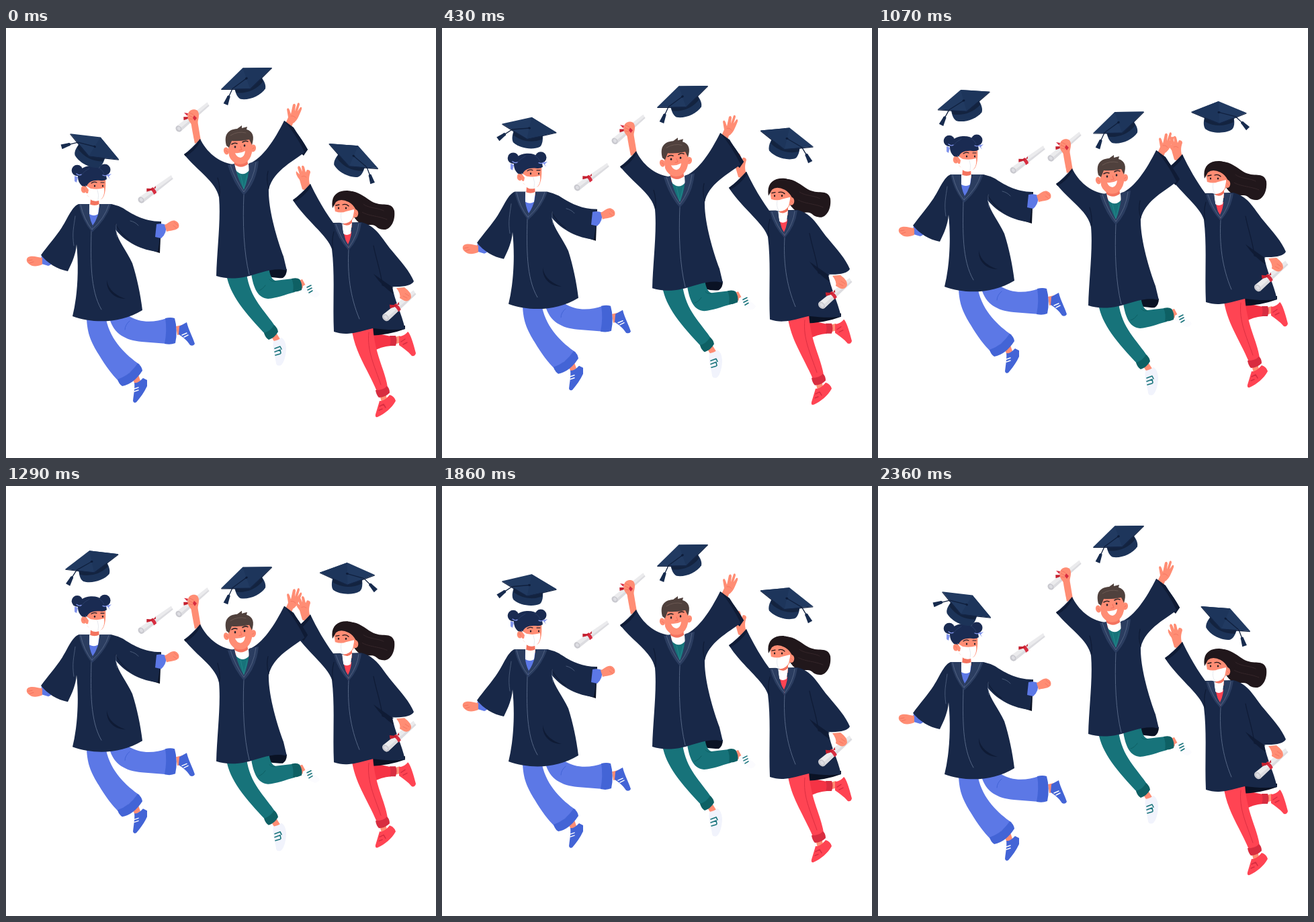
These frames come from a looping animation (640x640 px, 2.43 s). An HTML page:

```html
<!DOCTYPE html>
<html lang="en">
<head>
<meta charset="utf-8">
<title>Graduates</title>
<style>
  html, body { margin: 0; width: 100%; height: 100%; overflow: hidden; background: #fff; }
  svg { display: block; width: 100%; height: 100%; }
</style>
</head>
<body>
<svg id="stage" viewBox="0 0 640 640"></svg>
<script>
const NAVY = '#182848', DEEP = '#0f1b35', LAPEL = '#2b3d60', SEAM = '#556685',
      SKIN = '#ff8d74', FLUSH = '#f4735f', BLUE = '#5c78e6', BLUE2 = '#4364d6',
      TEAL = '#17737a', TEAL2 = '#0e6064', RED = '#ff4453', RED2 = '#d82d40';

const fill = (d, c) => `<path d="${d}" fill="${c}"/>`;
const line = (d, c, w = 1) =>
  `<path d="${d}" fill="none" stroke="${c}" stroke-width="${w}" stroke-linecap="round" stroke-linejoin="round"/>`;
const dot = (x, y, rx, c, ry = rx, a = 0) =>
  `<ellipse cx="${x}" cy="${y}" rx="${rx}" ry="${ry}" fill="${c}" transform="rotate(${a} ${x} ${y})"/>`;
const group = (id, ...parts) => `<g id="${id}">${parts.join('')}</g>`;

const scroll = (x, y, a, w = 1) => `<g transform="translate(${x} ${y}) rotate(${a}) scale(1 ${w})">` +
  fill('M0-5 L58-3 L57 3 L0 5Z', '#ebebed') + fill('M0 1 L57 1 L57 3 L0 5Z', '#dcdce0') +
  dot(0, 0, 4.2, '#c9c9cf', 5) + dot(0.5, 0, 2.2, '#dedee3', 2.8) +
  fill('M20-5 L25-5 Q27 0 25 5 L20 5 Q22 0 20-5Z', RED2) +
  fill('M23-4 L17-9 L14-5 L19-3 L23-2 L30-4 L28-1Z', '#c4202f') + '</g>';

const cap = (id, flip = 1) => `<g id="${id}"><g transform="scale(${flip} 1)">` +
  fill('M-22 6 C-24 16-23 22-20 25 C-10 32 10 32 20 25 C23 21 23 14 21 6Z', '#1c3358') +
  fill('M-22 6 L21 6 L21 14 Q0 25-22 14Z', '#13233f') +
  fill('M-41 0 L1-16.5 L41 0 L-1 16.5Z', '#213a61') +
  fill('M-41 0 L-1 16 L41 0 L41 1.2 L-1 18 L-41 1.2Z', '#142545') +
  fill('M1-16.5 L41 0 L-1 16 L0 0Z', '#1d355b') +
  dot(0, 0, 2, '#0e1c38', 1.5) +
  line('M0 0 L-25 6 L-35 15', '#10203e', 1.3) +
  fill('M-36 13 L-46 21 L-41 26 L-34 17Z', '#172b4e') + dot(-35, 15, 2.2, '#172b4e') +
  '</g></g>';

const girlLeft = group('girlLeft',
  scroll(201, 256, -36.5),
  // legs
  fill('M253 444 L262 442 L264 455 L255 457Z', SKIN),
  fill('M258 444 L269 438 C272 450 278 460 281 470 Q279 474 274 472 C269 464 262 459 257 456Z', BLUE2),
  line('M262 457 L269 454 M265 460 L271 457', '#fff', 1.5),
  fill('M154 432 C160 455 178 465 202 467 L240 470 L239 432 C222 438 200 440 182 428Z', BLUE),
  fill('M237 432 Q245 430 251 432 Q256 450 252 469 Q245 472 236 470 Q240 450 237 432Z', BLUE2),
  line('M184 436 Q177 442 177 449', BLUE2),
  fill('M188 522 L197 516 L200 525 L192 530Z', SKIN),
  fill('M191 528 C196 529 201 524 204 521 L210 524 L210 533 C206 542 200 550 194 557 Q190 559 189 555 C190 545 192 536 191 528Z', BLUE2),
  line('M191 537 L197 535 M191 541 L197 539', '#fff', 1.5),
  fill('M120 432 C121 456 127 468 138 486 C148 503 158 516 168 526 L199 501 C179 487 156 466 149 434Z', BLUE),
  fill('M166 523 Q184 517 196 499 Q202 503 203 510 Q190 530 173 533 Q168 530 166 523Z', BLUE2),
  // left hand
  fill('M54 336 L71 346 Q69 352 63 354 L53 351 Q51 344 54 336Z', BLUE),
  fill('M54 342 C47 341 39 338 33 341 C29 344 31 349 34 351 C39 356 47 355 54 352Z', SKIN),
  line('M33 346 L39 345 M35 350 L41 348', FLUSH),
  // gown
  fill('M163 290 L231 288 L229 335 L210 329Z', '#0a1122'),
  fill('M108 262 C98 266 92 283 83 297 C74 311 62 324 52 338 C62 350 76 359 92 362 C99 348 104 336 105 322 C108 350 107 380 104 402 Q102 417 99 429 C130 440 170 440 203 420 C200 396 195 372 188 350 C180 332 167 318 163 300 C178 319 203 331 226 333 Q230 310 230 288 C205 288 186 276 174 268 Q166 264 157 262Z', NAVY),
  line('M103 280 C101 296 98 305 101 324', SEAM, 0.8),
  line('M163 292 Q171 307 184 316', DEEP, 1.2),
  line('M164 292 Q163 302 165 311', SEAM, 0.7),
  line('M185 287 Q193 289 197 294', SEAM, 0.8),
  fill('M150 375 C152 390 165 399 178 403 C163 403 149 393 150 375Z', DEEP),
  line('M127 302 C126 345 125 390 142 419', SEAM),
  fill('M124 263 L139 263 L138 279 L129 303 L123 279Z', BLUE),
  fill('M126 254 L138 254 L139 267 L125 267Z', FLUSH),
  fill('M124 262 Q132 266 139 262 L137 277 Q131 281 124 277Z', '#fff'),
  fill('M108 262 L124 262 Q122 280 129 294 L128 304 Q113 286 108 262Z', LAPEL),
  fill('M157 262 L140 262 Q138 282 129 294 L128 304 Q148 287 157 262Z', LAPEL),
  line('M111 263 Q116 285 128 300 Q147 283 153 263', SEAM, 0.9),
  // right hand
  fill('M224 292 Q232 290 238 293 Q240 305 231 313 L222 311Z', BLUE),
  fill('M236 293 C242 291 246 285 252 287 Q259 290 257 297 C252 302 245 301 239 303Z', SKIN),
  line('M250 289 L256 294 M249 294 L254 298', FLUSH, 0.8),
  // head
  dot(106, 212, 8.3, '#1a2b52'), dot(147, 211, 8.5, '#1a2b52'),
  fill('M118 226 L148 222 C149 236 148 249 143 254 C134 259 122 254 119 245Z', SKIN),
  dot(116, 240, 4.3, SKIN, 5.5), line('M114 239 Q117 238 117 242', FLUSH, 0.8),
  fill('M107 222 C107 210 117 205 128 205 C141 205 149 212 150 225 Q146 228 140 227 C130 226 122 229 120 236 L113 235 C109 231 107 227 107 222Z', '#1a2b52'),
  line('M111 220 Q117 212 124 209 M136 207 Q144 211 146 217', '#30446f', 0.7),
  dot(132, 235, 1.2, '#25202d', 1.6), dot(144, 235, 1.1, '#25202d', 1.5),
  line('M127 231 Q131 228 135 230 M141 230 L146 230', '#25202d', 1.2),
  fill('M118 234 L126 239 Q137 241 146 238 C147 247 145 254 138 257 C130 259 125 256 123 251 L118 246 L122 246 L123 241Z', '#fff'),
  line('M136 241 Q139 249 137 256', '#e2e4ea', 0.8),
  fill('M102 220 L107 222 L105 230 L102 228Z M150 219 L157 217 L153 221 L155 225Z', '#8295ed'),
  line('M105 217 Q109 220 112 218 M144 219 Q149 221 152 218', '#8295ed', 1.3));

const boy = group('boy',
  // legs
  fill('M435 376 L441 374 L447 385 L440 388Z', SKIN),
  fill('M442 384 L451 379 C454 388 464 390 467 396 Q465 401 459 401 C451 398 447 393 441 390Z', '#fbfbfe'),
  line('M448 386 L454 383 M449 390 L455 387 M451 394 L456 391', TEAL, 1.6),
  fill('M390 356 L418 359 Q418 368 412 372 Q400 373 388 369Z', '#0a1224'),
  fill('M364 359 C367 383 373 402 390 403 C403 402 415 397 430 393 L427 373 L401 376 Q393 374 391 355Z', TEAL),
  fill('M425 373 Q433 371 437 374 Q442 382 440 390 Q434 393 427 393 Q429 382 425 373Z', TEAL2),
  line('M392 374 Q395 378 401 377 M376 391 Q382 389 386 383', TEAL2),
  fill('M394 458 L403 455 L408 463 L400 468Z', SKIN),
  fill('M398 466 Q405 465 410 461 Q416 464 417 476 C417 486 414 499 409 502 Q403 504 402 499 C401 489 396 478 398 466Z', '#f1f3fc'),
  line('M400 477 L408 474 L410 478 M400 482 L408 479 L409 484 M401 487 L408 485', TEAL, 1.6),
  fill('M328 367 C333 397 355 423 388 458 L402 446 C385 420 363 403 358 365Z', TEAL),
  fill('M384 454 Q394 451 399 442 Q404 446 405 452 Q400 461 391 464 Q386 461 384 454Z', TEAL2),
  // arms
  fill('M275 139 C277 152 279 162 281 172 L290 168 L285 138Z', SKIN),
  scroll(257, 150, -40),
  fill('M271 128 C272 122 280 119 285 123 C289 128 286 136 285 142 L276 143 C272 138 269 134 271 128Z', SKIN),
  line('M273 126 L279 129 M272 130 L278 133 M273 135 L278 136', FLUSH, 0.9),
  fill('M265 126 L271 127 L270 131Z M280 130 L284 134 L281 138 L278 134Z', RED2),
  fill('M412 151 L420 133 L418 121 Q420 117 422 122 L424 128 L427 114 Q430 111 431 115 L430 124 L434 112 Q437 110 437 114 L434 124 L438 118 Q441 117 440 121 C436 131 433 139 427 142 L422 156Z', SKIN),
  line('M424 131 Q429 130 431 134', FLUSH, 0.8),
  // gown
  fill('M414 138 L428 148 L449 181 L443 190 L420 170Z', DEEP),
  fill('M289 165 C298 184 316 200 338 203 L362 202 C382 194 400 166 414 138 Q432 150 449 181 C430 198 399 210 391 240 C390 270 404 316 413 340 L418 361 C400 355 375 366 358 370 C340 374 325 373 313 369 C314 330 320 285 317 252 C312 228 286 214 265 188 Q276 180 289 165Z', NAVY),
  fill('M414 138 Q433 152 449 181 L445 186 Q431 157 414 138Z', DEEP),
  fill('M289 165 Q278 182 265 188 L267 191 Q281 184 289 169Z', DEEP),
  line('M390 213 Q387 226 391 239 M315 223 Q319 236 318 250', DEEP, 1.2),
  line('M354 248 C352 290 354 335 362 367', SEAM),
  fill('M342 211 L363 209 L362 228 L354 246 L345 226Z', TEAL),
  line('M349 218 L354 240 L359 219', '#278c8f', 0.8),
  fill('M339 196 L359 194 L361 211 Q350 217 341 210Z', FLUSH),
  fill('M340 203 Q350 211 361 202 L362 212 Q353 222 343 213Z', '#fff'),
  fill('M330 204 L340 202 Q343 221 354 241 L354 249 Q338 231 330 204Z', LAPEL),
  fill('M376 198 L362 201 Q362 223 354 241 L354 249 Q373 230 376 198Z', LAPEL),
  line('M334 204 Q342 228 354 244 Q369 225 372 200', SEAM, 0.9),
  // head
  dot(328, 183, 4, SKIN, 5.5, -15), dot(368, 179, 4, SKIN, 5.5, 10),
  line('M327 182 L330 185 M369 178 L366 181', FLUSH),
  fill('M330 167 L365 164 C369 180 366 195 356 201 C345 206 335 199 332 190Z', SKIN),
  fill('M328 175 C324 159 330 151 344 150 L351 145 L351 149 L359 147 L358 151 C368 154 370 162 366 174 L362 166 Q348 169 336 168 L332 178Z', '#50413d'),
  line('M334 160 Q345 153 357 156', '#6a5852'),
  line('M336 173 Q340 170 344 172 M352 170 Q356 167 360 169', '#33282a', 1.6),
  dot(341, 177, 1.3, '#24202a', 1.8), dot(355, 175, 1.3, '#24202a', 1.8),
  line('M349 176 L351 181 L347 182', FLUSH, 1.2),
  fill('M341 186 Q349 187 356 183 Q355 192 349 193 Q343 192 341 186Z', '#fff'));

const girlRight = group('girlRight',
  // legs
  fill('M579 460 L586 458 L589 468 L581 470Z', SKIN),
  fill('M585 459 C590 459 595 456 598 452 C601 454 604 463 607 473 L610 484 Q609 489 604 488 C598 481 591 476 585 472Z', RED),
  line('M588 467 L594 463 M591 471 L597 468', RED2, 1.4),
  fill('M540 452 L573 459 L573 473 Q558 474 545 482Z', '#f53345'),
  fill('M571 458 L580 458 Q583 465 580 473 L571 473 Q574 466 571 458Z', RED2),
  fill('M540 442 L594 443 L594 448 Q570 457 540 458Z', '#0a1224'),
  fill('M556 546 L565 543 L567 552 L559 557Z', SKIN),
  fill('M556 555 C561 556 567 551 571 546 Q578 548 580 555 C574 566 564 574 553 579 Q549 580 550 575Z', RED),
  line('M556 563 L562 560 L565 565 M555 569 L560 567', RED2, 1.5),
  fill('M514 445 C519 483 536 503 553 543 L568 535 C564 508 549 487 546 444Z', RED),
  line('M540 453 C537 480 548 502 558 531', RED2, 0.9),
  fill('M550 539 Q562 539 567 533 Q571 536 571 543 Q564 550 555 550 Q551 546 550 539Z', RED2),
  // raised arm
  fill('M441 240 L437 226 Q430 217 432 213 L437 218 L434 208 Q435 203 438 207 L441 214 L440 206 Q442 203 444 207 L446 215 L448 211 Q453 211 453 215 C450 223 451 229 453 236 L457 246Z', SKIN),
  line('M440 221 Q444 219 447 222', FLUSH, 0.8),
  // hair
  fill('M500 246 C519 237 532 251 544 258 C559 267 574 257 578 272 C580 289 571 301 562 300 C549 299 554 292 540 293 C524 295 517 281 512 269Z', '#21171b'),
  line('M526 257 C537 270 551 266 562 272 M522 267 C532 281 551 278 567 285', '#3a2a2e', 0.8),
  // gown
  fill('M453 232 C463 253 474 272 487 290 L529 289 C552 295 559 313 574 331 C588 348 601 362 607 377 Q602 386 575 385 C578 405 589 425 594 448 C579 450 563 449 546 447 C525 452 508 459 488 452 C486 408 490 370 485 329 C479 309 445 285 427 256 Q438 248 453 232Z', NAVY),
  fill('M453 232 Q440 248 427 256 L429 259 Q444 251 454 236Z', DEEP),
  line('M488 303 Q484 317 487 330', DEEP, 1.2),
  line('M547 324 C551 345 559 366 560 383 Q567 386 576 386', DEEP, 1.2),
  fill('M574 385 L547 366 Q560 385 577 396Z', DEEP),
  line('M510 330 C508 365 512 400 526 433', SEAM),
  fill('M502 303 L516 303 L509 330Z', RED),
  fill('M502 286 L515 284 L515 297 L502 297Z', FLUSH),
  fill('M500 291 Q508 297 515 290 L513 306 Q507 310 502 306Z', '#fff'),
  fill('M488 291 L500 290 Q501 311 509 322 L510 331 Q493 313 488 291Z', LAPEL),
  fill('M529 290 L515 290 Q515 311 509 322 L510 331 Q526 313 529 290Z', LAPEL),
  line('M491 292 Q499 315 510 327 Q523 309 525 291', SEAM, 0.9),
  // low hand
  scroll(565, 431, -41, 1.2),
  fill('M581 387 L593 386 Q604 394 603 401 Q600 408 593 406 L586 402 Q588 396 581 387Z', SKIN),
  line('M591 399 L597 402 M594 395 L600 399', FLUSH, 0.9),
  // head
  fill('M488 261 C492 249 511 248 519 257 C524 269 520 284 511 289 C502 292 492 285 490 274Z', SKIN),
  fill('M486 268 C483 252 491 242 507 242 C526 243 533 255 532 270 L524 284 C524 274 519 264 510 259 Q498 253 491 259Z', '#21171b'),
  dot(520, 276, 4.3, SKIN, 6), line('M519 275 L522 278', FLUSH),
  line('M491 264 L496 263 M501 263 Q506 261 510 265', '#21171b', 1.3),
  dot(495, 268, 1.1, '#21171b', 1.5), dot(506, 268, 1.2, '#21171b', 1.6),
  fill('M490 273 Q499 276 506 273 L518 270 L518 273 L516 283 Q510 292 501 291 Q492 288 490 283Z', '#fff'),
  line('M499 275 Q497 283 501 290', '#e2e4ea', 0.8));

const stage = document.getElementById('stage');
stage.innerHTML = girlLeft + girlRight + boy + cap('capLeft') + cap('capMid') + cap('capRight', -1);

const LOOP = 2430, STEPS = 34;
const KEYS = [0, 6, 11, 15, 16, 21, 26, 33];
const TRACKS = {
  jump:   [0, 18.3, 32.2, 44, 46.5, 31.9, 18.9, 0],
  leftX:  [132, 130, 128, 127.5, 127.3, 128, 130, 132],
  leftY:  [176.5, 149, 126.5, 108, 103.5, 126, 147.5, 176.5],
  leftA:  [28, 9, -6.5, -19, -22, -6.5, 8.5, 28],
  midY:   [75, 102, 124, 140.5, 144.5, 124, 103, 75],
  rightX: [517.5, 513.5, 509.5, 507.5, 507, 509.5, 513.3, 517.5],
  rightY: [190.5, 164.5, 141.5, 125.5, 121.5, 144, 167.3, 197.5],
  rightA: [27, 17, 8, 1, -1, 8, 17, 27]
};

function at(name, k) {
  const v = TRACKS[name];
  let i = 0;
  while (i < KEYS.length - 2 && k > KEYS[i + 1]) i++;
  return v[i] + (v[i + 1] - v[i]) * (k - KEYS[i]) / (KEYS[i + 1] - KEYS[i]);
}

const place = (id, x, y, a = 0) =>
  document.getElementById(id).setAttribute('transform', `translate(${x} ${y}) rotate(${a})`);

function draw(ms) {
  const k = Math.min(STEPS - 1, Math.floor((ms % LOOP + 5) * STEPS / LOOP));
  const up = at('jump', k);
  place('girlLeft', 0, -up);
  place('girlRight', 0, -up);
  place('boy', 0, up);
  place('capLeft', at('leftX', k), at('leftY', k), at('leftA', k));
  place('capMid', 357.8, at('midY', k), -23);
  place('capRight', at('rightX', k), at('rightY', k), at('rightA', k));
}

const start = performance.now();
function tick() {
  draw(performance.now() - start);
  requestAnimationFrame(tick);
}
tick();
</script>
</body>
</html>
```
